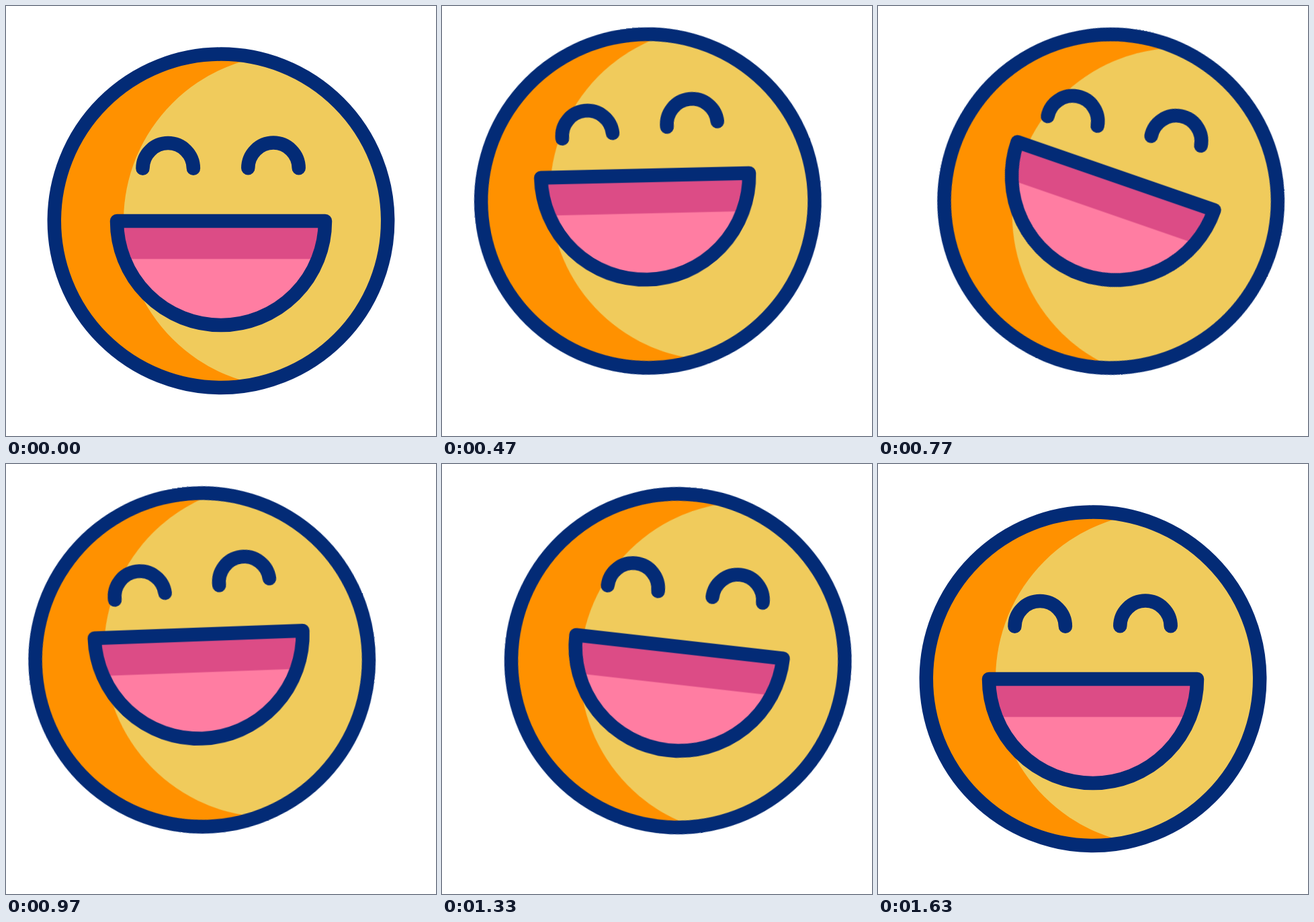
An HTML page without scripts for the animation above (2000 ms loop, 640x640 px).

```html
<!DOCTYPE html>
<html lang="en">
<head>
<meta charset="utf-8">
<title>Laughing face</title>
<style>
  html, body { margin: 0; width: 100%; height: 100%; overflow: hidden; background: #fff; }
  svg { display: block; width: 100%; height: 100%; }

  .line { fill: none; stroke: #032b76; stroke-width: 20.5; stroke-linecap: round; stroke-linejoin: round; }

  /* each part eases like a sine between its turning points */
  .sway, .lift, .tilt, .eyes, .mouth, .twist {
    transform-origin: 320px 320px;
    animation: 2s cubic-bezier(.37, 0, .63, 1) infinite;
  }
  .sway { animation-name: sway; }
  .lift { animation-name: lift; }
  .tilt { animation-name: tilt; }
  .eyes { animation-name: eyes; }
  .mouth { animation-name: mouth; }
  .twist { animation-name: twist; }

  @keyframes sway {
    0%, 80%, 100% { transform: translateX(0); }
    14.3% { transform: translateX(21.4px); }
    29.5% { transform: translateX(-31px); }
    39.3% { transform: translateX(27.5px); }
    50.5% { transform: translateX(-32.5px); }
    66.7% { transform: translateX(31.2px); }
  }
  @keyframes lift {
    0%, 80%, 100% { transform: translateY(0); }
    13.3% { transform: translateY(-27.5px); }
    20.8% { transform: translateY(-30.2px); }
    29.3% { transform: translateY(-27.2px); }
    34.5% { transform: translateY(-32.5px); }
    39.3% { transform: translateY(-29px); }
    45% { transform: translateY(-33px); }
    50% { transform: translateY(-27px); }
    57.7% { transform: translateY(-32px); }
    66.7% { transform: translateY(-27px); }
  }
  @keyframes tilt {
    0%, 80%, 100% { transform: rotate(0); }
    13.3% { transform: rotate(13.5deg); }
    28.8% { transform: rotate(-13deg); }
    40% { transform: rotate(12deg); }
    52.7% { transform: rotate(-14deg); }
    70% { transform: rotate(8.6deg); }
  }
  @keyframes eyes {
    0%, 80%, 100% { transform: translateY(0); }
    13.3%, 60% { transform: translateY(-28px); }
  }
  @keyframes mouth {
    0%, 74%, 100% { transform: translateY(0); }
    13.3%, 60% { transform: translateY(-38.5px); }
  }
  @keyframes twist {
    0%, 60%, 100% { transform: rotate(0); }
    41.7% { transform: rotate(8.2deg); }
  }
</style>
</head>
<body>
<svg viewBox="0 0 640 640">
  <defs>
    <clipPath id="head"><circle cx="320" cy="320" r="246"/></clipPath>
    <path id="smile" d="M165 320H475A155 155 0 0 1 165 320Z"/>
    <clipPath id="inside"><use href="#smile"/></clipPath>
    <path id="eye" class="line" d="M-37.7 0a37.7 37.7 0 0 1 75.4 0"/>
  </defs>
  <g class="sway"><g class="lift"><g class="tilt">
    <circle cx="320" cy="320" r="246" fill="#ff9100"/>
    <g clip-path="url(#head)"><circle cx="423" cy="320" r="248" fill="#f0cb5c"/></g>
    <circle class="line" cx="320" cy="319.8" r="248.2"/>
    <g class="eyes">
      <use href="#eye" x="241.2" y="241.8"/>
      <use href="#eye" x="398" y="241.3"/>
    </g>
    <g class="mouth"><g class="twist">
      <use href="#smile" fill="#dc4c86"/>
      <g clip-path="url(#inside)"><rect x="160" y="376.5" width="320" height="110" fill="#ff7da2"/></g>
      <use href="#smile" class="line"/>
    </g></g>
  </g></g></g>
</svg>
</body>
</html>
```
